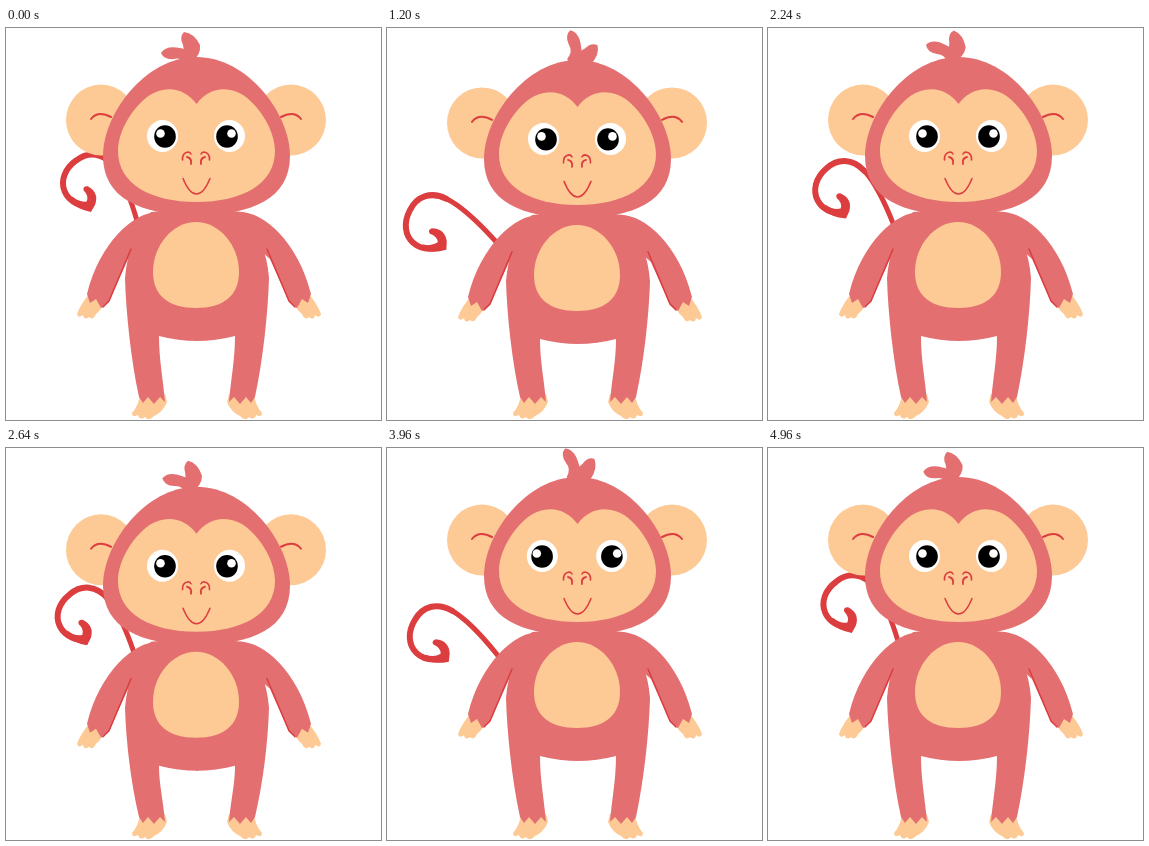
Write an HTML page with a canvas that moves like this. It is 375 by 392 pixels and loops after 5 s.

```html
<!DOCTYPE html>
<html lang="en">
<head>
<meta charset="utf-8">
<title>Monkey</title>
<style>
  html, body { margin: 0; width: 100%; height: 100%; overflow: hidden; background: #fff; }
  canvas { display: block; width: 375px; height: 392px; }
</style>
</head>
<body>
<canvas id="stage"></canvas>
<script>
const LOOP = 5000, STEP = 40, SWAY = 2500;
const FUR = '#e36f71', SKIN = '#fdca95', RED = '#dc3d3f', BLACK = '#000', WHITE = '#fff';

const canvas = document.getElementById('stage');
const ctx = canvas.getContext('2d');
const ratio = window.devicePixelRatio || 1;
canvas.width = 375 * ratio;
canvas.height = 392 * ratio;

const fill = (d, color) => {
  ctx.fillStyle = color;
  ctx.fill(new Path2D(d));
};
const line = (d, width, color = RED) => {
  ctx.strokeStyle = color;
  ctx.lineWidth = width;
  ctx.lineCap = ctx.lineJoin = 'round';
  ctx.stroke(new Path2D(d));
};
const oval = (x, y, rx, ry, color) => {
  ctx.fillStyle = color;
  ctx.beginPath();
  ctx.ellipse(x, y, rx, ry, 0, 0, Math.PI * 2);
  ctx.fill();
};
// Draws a left part and its reflection about x = axis.
const both = (axis, draw) => {
  draw();
  ctx.save();
  ctx.transform(-1, 0, 0, 1, 2 * axis, 0);
  draw();
  ctx.restore();
};
const turned = (x, y, degrees, draw) => {
  ctx.save();
  ctx.translate(x, y);
  ctx.rotate(degrees * Math.PI / 180);
  ctx.translate(-x, -y);
  draw();
  ctx.restore();
};

// Smooth rise and fall between two moments, zero elsewhere.
const bump = (t, start, end) =>
  t > start && t < end ? Math.sin(Math.PI * (t - start) / (end - start)) ** 2 : 0;

function tail(swing) {
  turned(145, 255, 28 * (0.56 - swing), () => {
    line('M145 255 C133 235 125 215 116 201 C105 183 91 163 78 153', 5);
    line('M78 153 C64 142 49 145 40 157 C31 168 30 181 37 190 C44 199 54 200 64 199', 6);
    fill('M46 193 Q54 197 61 194 Q62 188 55 184 Q53 180 58 179 Q71 182 70 195 L68 203 Q52 204 46 198Z', RED);
  });
}

function leg(dip) {
  fill(`M134 366 Q133 377 126 385 Q126 390 132 387 Q134 393 139 389
    Q143 394 148 388 Q157 384 161 374 L159 366Z`, SKIN);
  fill(`M192 ${180 + dip} L145 ${184 + dip} Q122 ${212 + dip} 119 ${250 + dip}
    C120 ${285 + dip} 125 ${332 + dip / 3} 133 369
    L137 375 L142 369 L148 376 L154 369 L159 374
    C157 350 153 ${332 + dip / 2} 153 ${308 + dip}
    Q172 ${313 + dip} 192 ${313 + dip}Z`, FUR);
}

function arm() {
  fill(`M85 264 Q75 275 71 286 Q72 291 77 287 Q78 293 83 289
    Q87 293 90 286 Q97 281 99 270Z`, SKIN);
  fill(`M152 184 C128 184 94 214 81 266 L84 275 L90 271 L95 280 L103 274
    Q112 253 122 231 L152 205Z`, FUR);
  line('M97 279 L103 273 Q111 254 125 221', 1.5);
}

function hair(swing) {
  turned(187, 32, 74 * swing, () => {
    fill('M186 34 Q195 27 194 17 Q188 5 178 4 Q173 9 177 17 Q179 27 180 34Z', FUR);
    fill('M190 38 Q188 22 174 20 Q160 17 155 25 Q158 32 168 31 Q176 29 181 37Z', FUR);
  });
}

function head(spread) {
  fill(`M190.5 29 C139 29 97 86 97 128 C97 170 134 187 190.5 187
    C247 187 284 170 284 128 C284 86 242 29 190.5 29Z`, FUR);
  fill(`M190.5 76 C180 62 165 58 150 64 C132 71 112 100 112 123
    C112 156 145 174 190.5 174 C236 174 269 156 269 123
    C269 100 249 71 231 64 C216 58 201 62 190.5 76Z`, SKIN);
  both(190, () => {
    oval(156.5 - spread * 0.3, 108, 15.5, 16, WHITE);
    oval(159 - spread, 108.5, 10.8, 11.2, BLACK);
    oval(154.5 - spread * 1.2, 105.5, 4.3, 4.3, WHITE);
    line('M176.5 132 Q176 125 182 124 Q184 124 185 126', 1.6);
    line('M181 129 Q186 130 185 136', 1.8);
  });
  line('M177 150.5 C180 158 185 166 190.5 166 C196 166 201 158 204 150.5', 1.5);
}

function draw(t) {
  const phase = t % SWAY / SWAY;
  const swing = 1 - Math.abs(1 - 2 * phase);
  const dip = 22 * (bump(t, 40, 1355) + bump(t, 2335, 3650));
  const spread = 4 * bump(t, 3350, 4700);

  ctx.setTransform(ratio, 0, 0, ratio, 0, 0);
  ctx.fillStyle = WHITE;
  ctx.fillRect(0, 0, 375, 392);

  ctx.save();
  ctx.translate(0, dip);
  tail(swing);
  both(190, () => {
    oval(95, 92, 35, 35.5, SKIN);
    line('M85 91 Q92 82 105 89', 2);
  });
  ctx.restore();

  both(191, () => leg(dip));

  ctx.translate(0, dip);
  both(193, arm);
  fill(`M190 194 C167 194 147 217 147 244 C147 268 163 280 190 280
    C217 280 233 268 233 244 C233 217 213 194 190 194Z`, SKIN);
  hair(swing);
  head(spread);
}

function tick(now) {
  draw(Math.floor(now % LOOP / STEP) * STEP);
  requestAnimationFrame(tick);
}
draw(0);
requestAnimationFrame(tick);
</script>
</body>
</html>
```
